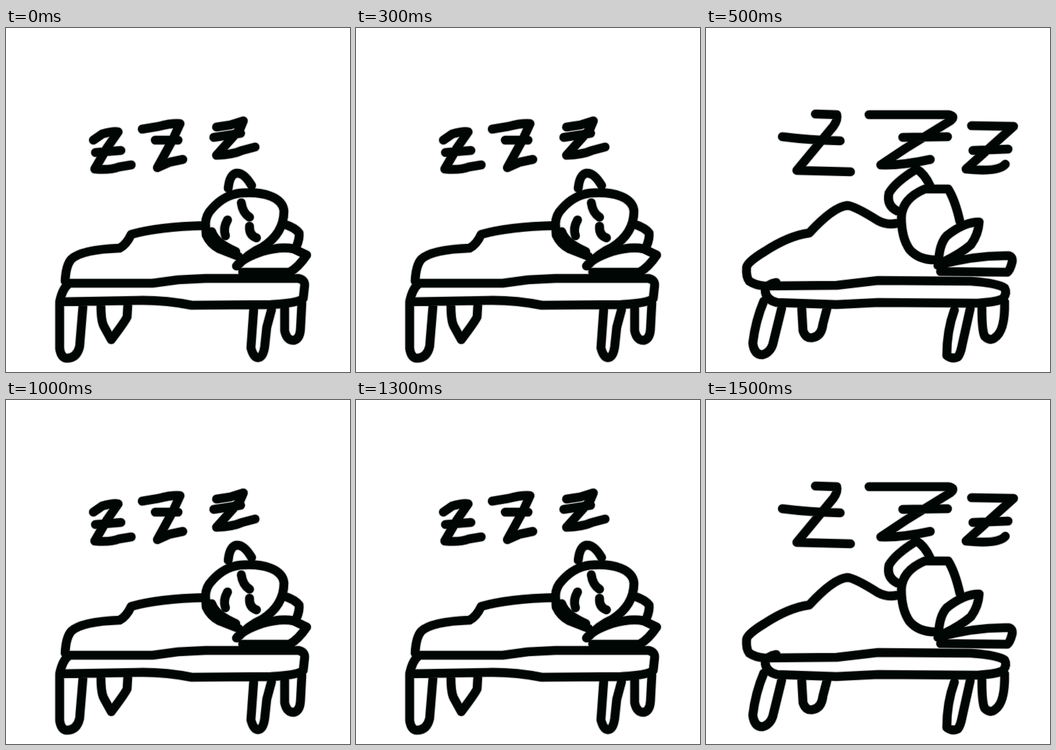
Write an HTML page with a canvas that moves like this. It is 500x500 px and loops after 2 s.

```html
<!DOCTYPE html>
<html lang="en">
<head>
<meta charset="utf-8">
<title>Sleeping</title>
<style>
html, body { margin: 0; width: 100%; height: 100%; overflow: hidden; background: #fff; }
canvas { display: block; width: 500px; height: 500px; }
</style>
</head>
<body>
<canvas id="stage" width="500" height="500"></canvas>
<script>
const ctx = document.getElementById('stage').getContext('2d');
const HOLD = 500;

const smallSnore = `
  M127 163L140 154Q157 149 163 151L147 174L129 205Q152 207 164 202L182 199
  M130 181L167 178
  M198 147L222 143Q240 138 253 139L243 161L220 203L238 195L257 191
  M217 163L250 163
  M306 144L326 141L345 135L340 147L306 185Q330 184 343 178L362 173
  M302 159L341 153`;

const faceUp = `
  M323 233Q325 213 335 211Q346 210 357 229
  M340 240C375 237 402 246 404 266C404 290 391 307 372 319Q353 327 336 346
  M340 240Q317 243 300 262Q290 272 290 285L291 301Q297 314 310 321L338 332
  M299 296Q304 312 334 325
  M342 254Q344 269 354 275
  M322 279Q315 291 319 302
  M354 288Q353 301 364 305`;

const flatBed = `
  M404 285Q420 290 426 298Q427 306 422 318
  M335 346Q345 334 372 325Q400 317 418 321L437 330Q425 348 412 355L344 355
  M290 287Q220 289 182 300Q175 315 165 320Q110 322 95 336Q87 345 86 368
  M92 371L213 371L250 366L290 364L425 364Q435 366 434 375L432 393Q425 400 385 402
  L270 403Q230 395 190 396L78 398Q82 378 92 371`;

const straightLegs = `
  M78 400L78 466Q80 479 88 480Q103 480 107 463L112 402
  M138 403Q138 425 142 433L153 453Q172 428 176 420L177 403
  M360 409L356 465Q360 480 367 479Q374 478 376 463L379 435L386 409
  M405 404L405 440Q408 454 418 454Q427 452 428 438L430 400`;

const bigSnore = `
  M159 125L190 126Q192 133 185 143L132 207L210 209
  M111 158Q150 163 195 164
  M237 126L352 126Q364 128 355 135L290 175L254 199Q285 200 326 191
  M286 159L351 158
  M386 142L447 143L378 205Q425 210 435 198
  M388 178L439 176`;

const faceAway = `
  M278 266Q262 258 266 240Q275 224 306 205Q318 212 326 230
  M336 337Q310 338 296 322Q284 305 284 275Q285 248 318 234L352 234Q362 250 369 281
  M338 345Q338 315 350 302Q375 282 397 282Q396 300 385 315Q370 328 345 340`;

const bumpyBed = `
  M337 345Q390 330 440 331Q446 333 445 340Q442 352 438 355L341 354
  M277 284Q263 287 250 280Q215 258 205 258Q185 260 150 298Q120 302 85 325
  Q60 340 59 348Q58 362 63 368Q72 374 85 375L190 374L250 367L385 368
  Q425 371 434 378Q438 385 432 393Q425 398 395 400L250 399L190 402L103 399
  Q86 395 86 380Q90 372 102 370`;

const bentLegs = `
  M84 397Q72 425 68 458Q70 475 82 475Q93 472 97 460L110 407
  M139 405L141 440Q145 452 155 450Q168 448 170 430L176 407
  M361 410Q350 440 350 476Q358 482 366 478Q370 473 372 462L384 408
  M401 407Q401 440 405 448Q413 456 420 450Q435 440 434 398`;

const poses = [
  [smallSnore, faceUp, flatBed, straightLegs],
  [bigSnore, faceAway, bumpyBed, bentLegs]
].map(parts => new Path2D(parts.join(' ')));

function ink(path, width, color) {
  ctx.lineWidth = width;
  ctx.strokeStyle = color;
  ctx.stroke(path);
}

function draw(now) {
  const pose = poses[Math.floor(now / HOLD) % poses.length];
  ctx.fillStyle = '#fff';
  ctx.fillRect(0, 0, 500, 500);
  // Soft brush edge under the solid core.
  ink(pose, 14.6, 'rgba(0, 6, 4, 0.25)');
  ink(pose, 12.6, '#000604');
}

ctx.lineCap = ctx.lineJoin = 'round';
const start = performance.now();
function tick() {
  draw(performance.now() - start);
  requestAnimationFrame(tick);
}
tick();
</script>
</body>
</html>
```
